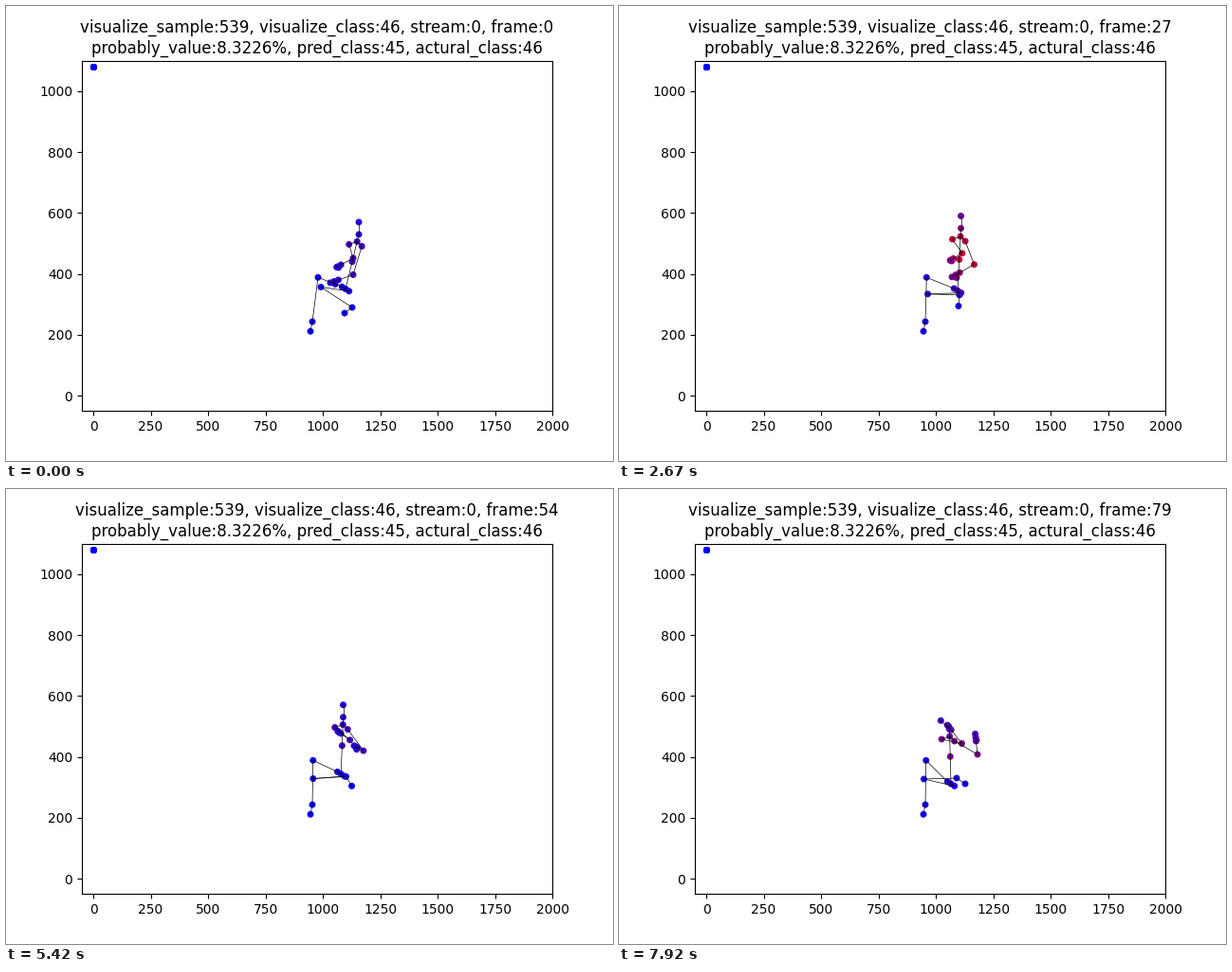
Animation, 640 px wide and 480 px high, one loop 8000 ms. Source, as a matplotlib script:

```python
import numpy as np
import matplotlib.pyplot as plt
from matplotlib.animation import FuncAnimation
from matplotlib.collections import LineCollection

LOOP, STEP = 8000, 20      # ms
KEYS = [0, 16, 34, 72]     # counts at which the guide points below are reached

# Guide points in stage pixels; every other joint follows from these
GUIDES = {
    "neck": [(372, 241), (364.5, 235.5), (358.5, 234), (353, 246.5)],
    "base": [(358, 298.5), (357, 298), (357, 301.5), (350, 300)],
    "elbow_a": [(366, 283.5), (372.5, 275), (375.5, 271.5), (378, 280)],
    "hand_a": [(346, 290.5), (345, 285), (360, 283), (376, 262)],
    "elbow_b": [(366, 266), (357.5, 261.5), (364, 260.5), (361.5, 268.5)],
    "hand_b": [(349.5, 275), (340.5, 278), (354.5, 263), (347, 250)],
    "knee_b": [(332, 296.5), (323.5, 301.5), (326.5, 305), (321.5, 306)],
    "ankle_b": [(365, 318), (354, 311.5), (361.5, 301.5), (356, 305)],
    "foot_b": [(357, 324), (346, 317.5), (364, 316), (365, 311)],
}
GUIDES = {name: np.array(points, float) for name, points in GUIDES.items()}

CHAINS = [
    "head neck chest belly base",
    "chest shoulder_a elbow_a wrist_a hand_a tip_a",
    "hand_a thumb_a",
    "chest shoulder_b elbow_b wrist_b hand_b tip_b",
    "hand_b thumb_b",
    "base hip_a knee_a ankle_a foot_a",
    "base hip_b knee_b ankle_b foot_b",
]
NAMES = sorted({name for chain in CHAINS for name in chain.split()})
BONES = np.array([
    (NAMES.index(a), NAMES.index(b))
    for chain in CHAINS
    for a, b in zip(chain.split(), chain.split()[1:])
])

# How strongly each body part lights up
GLOW = dict(head=.5, neck=.65, chest=.9, belly=1, base=.4, shoulder=1, elbow=1,
            wrist=.75, hand=.6, tip=.6, thumb=.6, hip=.3, knee=.2, ankle=.15, foot=.1)
glow = np.array([GLOW[name.split("_")[0]] for name in NAMES])


def smooth(u):
    u = np.clip(u, 0, 1)
    return u * u * (3 - 2 * u)


def mix(a, b, u):
    return a + (b - a) * u


def guide(points, n):
    """Eased travel from one guide point to the next."""
    i = max(j for j in range(len(KEYS) - 1) if KEYS[j] <= n)
    return mix(points[i], points[i + 1], smooth((n - KEYS[i]) / (KEYS[i + 1] - KEYS[i])))


def pose_at(n):
    p = {name: guide(points, n) for name, points in GUIDES.items()}

    # The trunk slumps and the head tips over at the end
    slump = smooth((n - 72) / 7)
    p["neck"] += np.array([-4.5, 7]) * slump
    p["base"] += np.array([0, 11]) * slump
    tilt = np.pi / 4 * np.clip((n - 60) / 19, 0, 1) ** 3
    p["head"] = p["neck"] - 13 * np.array([np.sin(tilt), np.cos(tilt)])
    p["chest"] = mix(p["neck"], p["base"], .13)
    p["belly"] = mix(p["neck"], p["base"], .5)

    p["shoulder_a"] = p["chest"] + (5, 5)
    p["shoulder_b"] = p["chest"] + (-8.5, 3)
    for side, reach, thumb in (("a", 1.2, (1, 3)), ("b", 1.05, (1, 1))):
        elbow, hand = p["elbow_" + side], p["hand_" + side]
        p["wrist_" + side] = mix(elbow, hand, .78)
        p["tip_" + side] = mix(elbow, hand, reach)
        p["thumb_" + side] = hand + thumb

    # One leg stands still
    p["hip_a"], p["hip_b"] = p["base"] - (3.7, 2.3), p["base"] + (3.7, 2.3)
    p["knee_a"] = np.array([323.7 + 5.3 * np.exp(-n / 12), 286.3])
    p["ankle_a"] = np.array([323, 333])
    p["foot_a"] = np.array([321, 343.2])
    return np.array([p[name] for name in NAMES])


def to_data(px):
    """Stage pixels to axis units."""
    x = (px[:, 0] - 80) / 496 * 2050 - 50
    y = (427.2 - px[:, 1]) / 369.6 * 1150 - 50
    return np.column_stack([x, y])


def colors_at(n):
    """Blue to red, with two bursts of activity."""
    def burst(mid, width):
        return np.exp(-((n - mid) / width) ** 2)

    heat = glow * (.25 + .7 * burst(21, 11) + .45 * burst(72, 8))
    return np.column_stack([heat, 0 * heat, 1 - heat])


def count_at(ms):
    """Twelve ticks a second, every sixth one held."""
    tick = int((ms + 14) * 12 / 1000)
    return tick - (tick + 3) // 6


fig, ax = plt.subplots(figsize=(6.4, 4.8), dpi=100)
ax.set_xlim(-50, 2000)
ax.set_ylim(-50, 1100)
title = ax.set_title("")

# The empty second body collapses into the corner
ax.scatter([0] * 25, [1080] * 25, s=16, color="blue")
dots = ax.scatter([0] * len(NAMES), [0] * len(NAMES), s=16)
lines = LineCollection([], colors="black", linewidths=0.5, zorder=2)
ax.add_collection(lines, autolim=False)


def update(k):
    n = count_at(k * STEP)
    xy = to_data(pose_at(n))
    dots.set_offsets(xy)
    dots.set_color(colors_at(n))
    lines.set_segments(xy[BONES])
    title.set_text(
        f"visualize_sample:539, visualize_class:46, stream:0, frame:{n}\n"
        "probably_value:8.3226%, pred_class:45, actural_class:46"
    )
    return dots, lines, title


anim = FuncAnimation(fig, update, frames=LOOP // STEP, interval=STEP,
                     init_func=lambda: update(0), repeat=True, repeat_delay=0)
plt.show()
```
